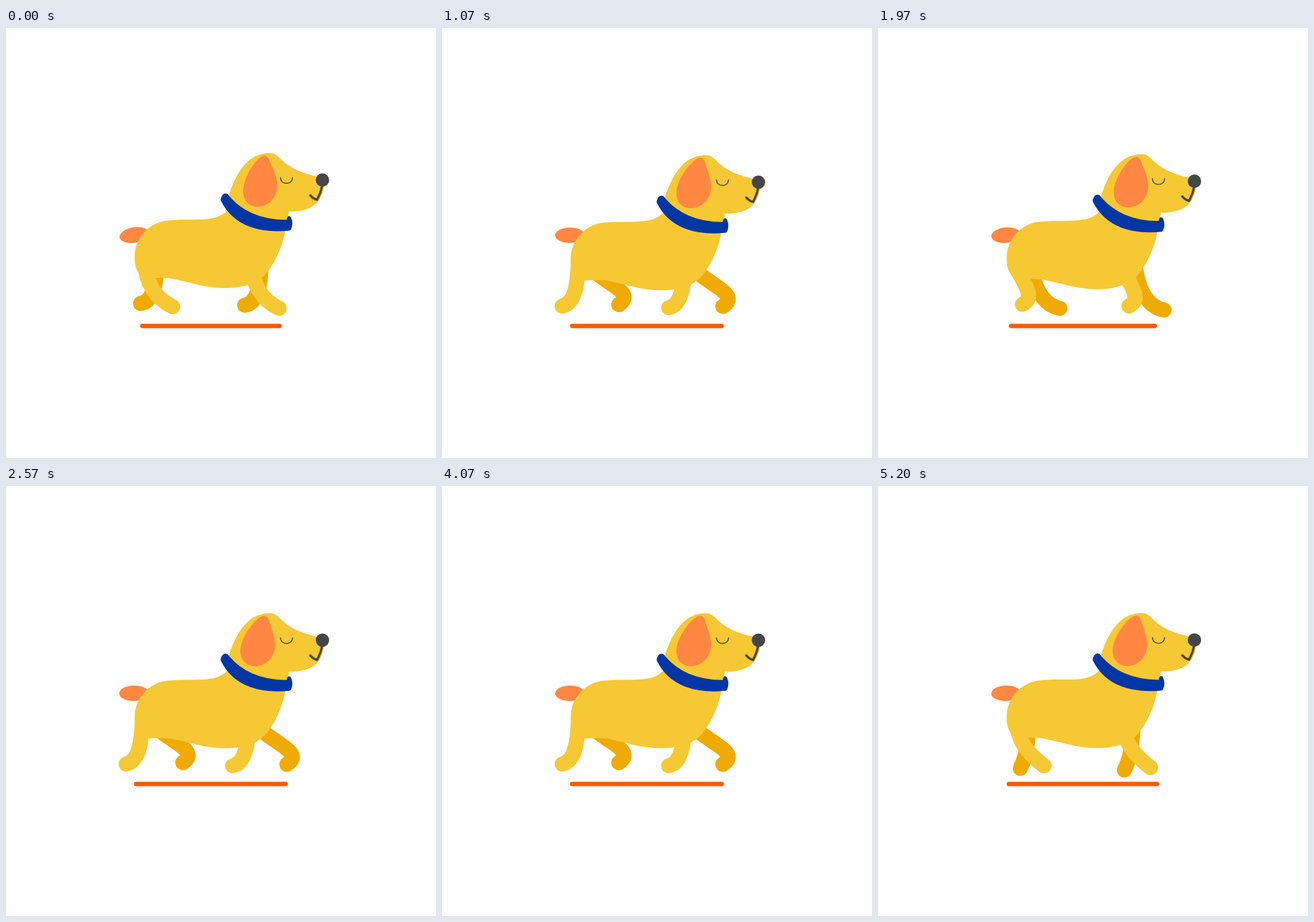
An HTML page without scripts for the animation above (5230 ms loop, 640 px wide and 640 px high).

```html
<!DOCTYPE html>
<html lang="en">
<head>
<meta charset="utf-8">
<title>Trotting dog</title>
<style>
  /* how far the body has sunk below its resting height */
  @property --dip { syntax: "<number>"; inherits: true; initial-value: 0; }

  html, body { margin: 0; width: 100%; height: 100%; overflow: hidden; background: #fff; }
  svg {
    --stride: .75s;
    display: block; width: 100vw; height: 100vh;
    /* sine-like bob, two per stride */
    animation: bob calc(var(--stride) / 4) cubic-bezier(.364, 0, .636, 1) -.343s infinite alternate;
  }
  @keyframes bob { from { --dip: -.5; } to { --dip: 8.3; } }

  .dog { transform: translateY(calc(var(--dip) * 1px)); }
  .ear { transform: rotate(calc(var(--dip) * 1.4deg)); transform-origin: 386px 192px; }
  .tail { transform: rotate(calc(var(--dip) * 2.8deg - 10deg)); transform-origin: 208px 305px; }
  .ground { transform: scaleX(calc(.816 + var(--dip) * .0222)); transform-origin: 305px 443.5px; }

  .leg {
    fill: none; stroke-width: 22.5; stroke-linecap: round;
    animation: stride var(--stride) linear infinite;
  }
  .near { stroke: #f6c834; animation-delay: -.705s; }
  .far { stroke: #efab03; animation-delay: -.28s; }

  /* plant, push, lift, swing, reach, straighten */
  @keyframes stride {
    0%, 100% { d: path("M206,345 C208,383 224,411 249,415.5"); }
    30.7% { d: path("M203,345 C202,370 201,395 190,417.3"); }
    37.3% { d: path("M203,345 C202,375 199,407 178,410"); }
    56.7% { d: path("M204,345 C208,372 239,396 215,409.5"); }
    80% { d: path("M200,354 C215,374 270,390 241,408.3"); }
    87.3% { d: path("M206,345 C207,376 222,394 247,413.5"); }
  }

  .coat { fill: #f6c834; }
  .flap { fill: #ff8742; }
  .collar { fill: #0037a4; stroke: #0037a4; stroke-width: 6; stroke-linejoin: round; }
  .ink { fill: none; stroke: #464646; stroke-linecap: round; stroke-linejoin: round; }
</style>
</head>
<body>
<svg viewBox="0 0 640 640">
  <rect class="ground" x="176.3" y="440.2" width="257.4" height="6.6" rx="3.3" fill="#ff5a00"/>

  <g class="dog">
    <path class="leg far" transform="translate(22)"/>
    <path class="leg far" transform="translate(177 2.5)"/>
    <ellipse class="tail flap" cx="190.5" cy="305" rx="22" ry="11.5"/>
    <path class="leg near"/>
    <path class="leg near" transform="translate(158.5 2.5)"/>

    <path class="coat" d="M332,248 C340,224 356,186 392,186 C401,186 405,191 410,196
      C422,208 440,216 463,221 L474,230 C473,247 466,258 459,263.5 C449,271 436,273.5 421,273
      L420,280 L416,300 C413,318 405,342 390,362 C384,370 374,379 358,383
      C344,387 334,387 324,387 C298,387 272,378 247,373 C236,371 222,372 204,373
      C196,365 191.5,356 191.5,342 C191,312 214,289 240,286.5 C262,284 280,286 298,284.5
      C312,283 322,280 330,271 Z"/>

    <path class="collar" d="M328,249.5 C347,274 378,289 420,288.5 L421.5,283
      Q425,291 421.500,298.500 C380,302.500 341,293 322.500,255.500 Q324,248 328,249.500 Z"/>

    <path class="ear flap" d="M380,191.5 C384,189 389,190 391,195 C396,207 404,220 404,236
      C403,254 389,266 375,266 C361,266 353,256 353,243 C353,225 368,199 380,191.5 Z"/>

    <path class="ink" stroke-width="1.4" d="M408.500,222.500 C408.500,234 426.500,234 426.500,222.500"/>
    <path class="ink" stroke-width="3.4" d="M470.500,235 C469,243 466,250 463,255.500 Q457,254 453,249"/>
    <circle cx="471" cy="226.2" r="10" fill="#464646"/>
  </g>
</svg>
</body>
</html>
```
